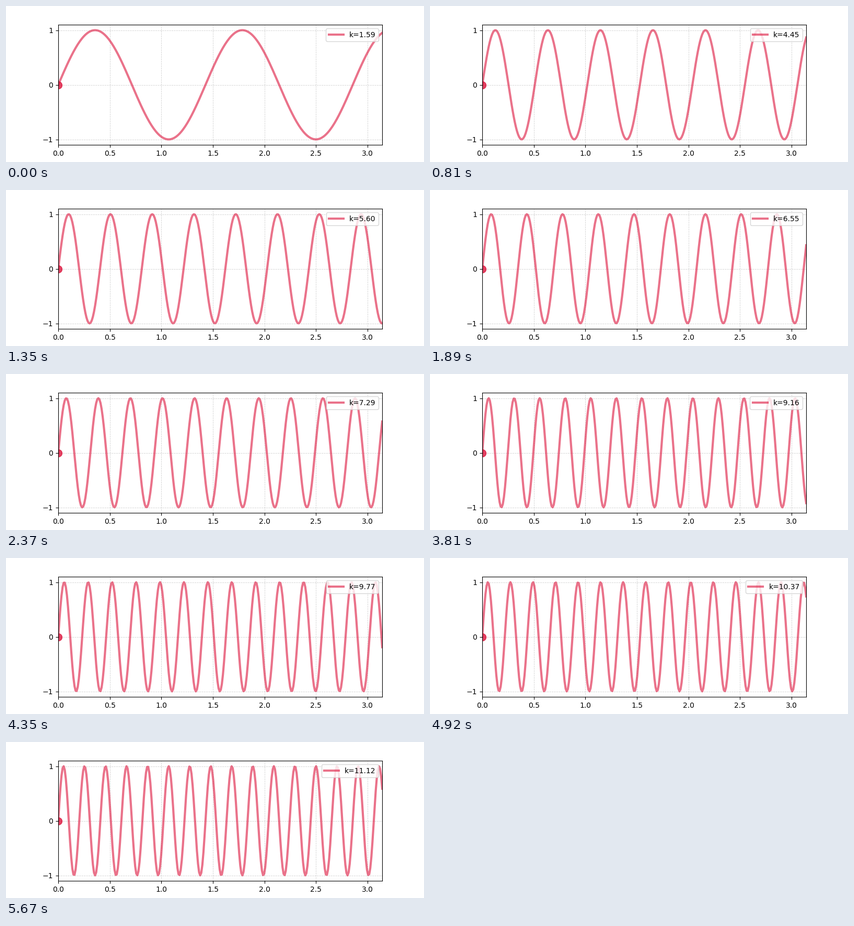
Recreate the animation shown at these times as a matplotlib script. Size 800x300 px, loop 5700 ms.

```python
import numpy as np
import matplotlib.pyplot as plt
from matplotlib.animation import FuncAnimation

FRAMES, INTERVAL = 190, 30
LABEL_SCALE, WAVE_SCALE = 1.5883, 4.4

# wave number grows with the square root of a linear energy ramp
roots = np.sqrt(np.linspace(1, 49, FRAMES))
x = np.linspace(0, np.pi, 300)

fig, ax = plt.subplots(figsize=(8, 3), dpi=100)
ax.set_xlim(0, np.pi)
ax.set_ylim(-1.1, 1.1)
ax.set_yticks([-1, 0, 1])
ax.grid(ls="--", lw=0.6, alpha=0.6)

wave, = ax.plot([], [], color="crimson", lw=3, alpha=0.6, label="k=0.00")
ax.plot([0], [0], "o", color="crimson", ms=10, alpha=0.8)
label = ax.legend(loc="upper right").get_texts()[0]


def update(i):
    wave.set_data(x, np.sin(WAVE_SCALE * roots[i] * x))
    label.set_text(f"k={LABEL_SCALE * roots[i]:.2f}")
    return wave, label


anim = FuncAnimation(fig, update, frames=FRAMES, interval=INTERVAL,
                     repeat=True, repeat_delay=0)
plt.show()
```
